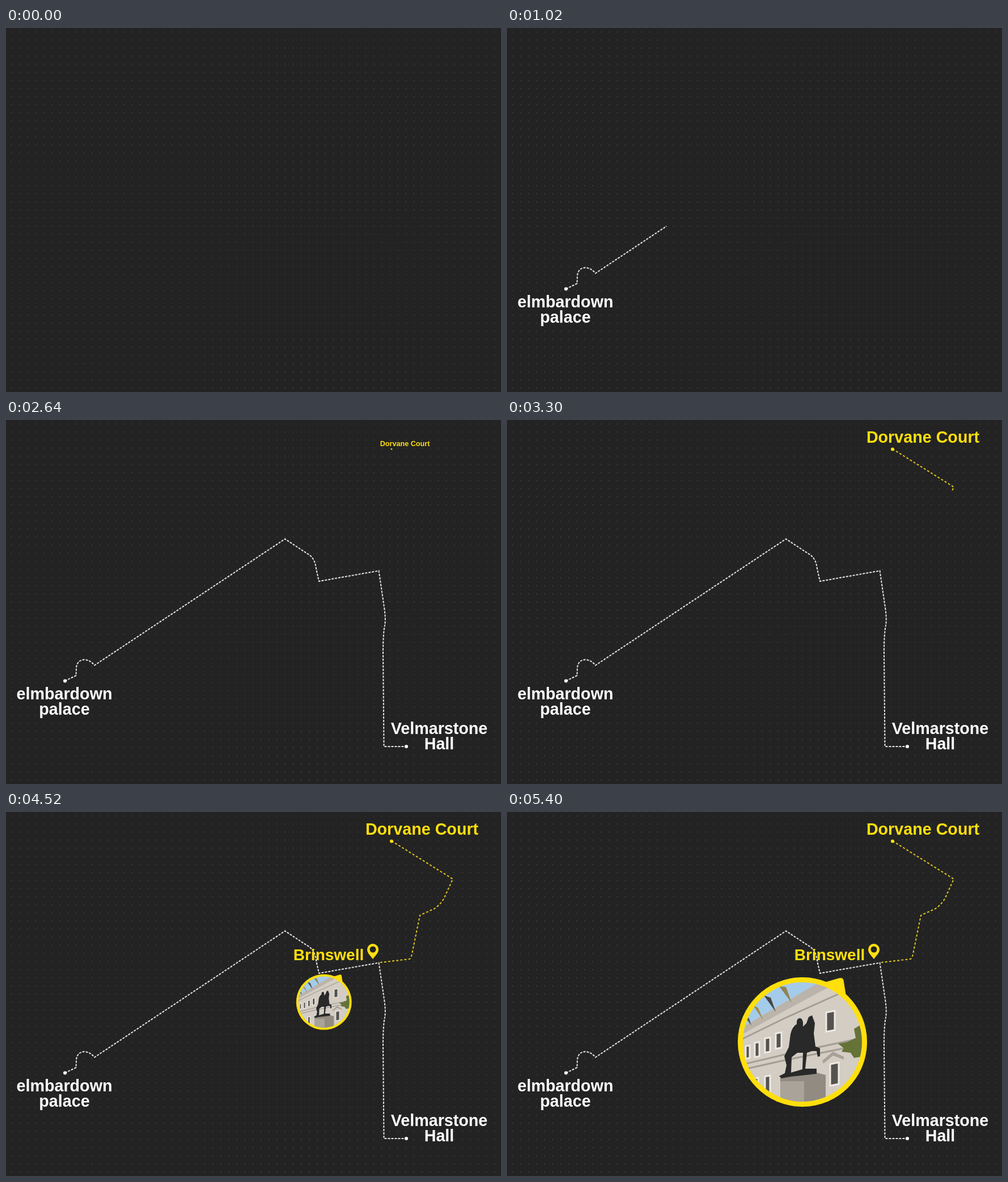
Animation, 873 px wide and 641 px high, one loop 7080 ms. Source, as an HTML page:

```html
<!DOCTYPE html>
<html lang="en">
<head>
<meta charset="utf-8">
<title>Route map</title>
<style>
  html, body { margin: 0; width: 100%; height: 100%; overflow: hidden; background: #232323; }
  svg { display: block; width: 873px; height: 641px; }
  text { font: bold 28.7px 'Liberation Sans', Arial, sans-serif; text-anchor: middle; }
  .white { fill: #fff; }
  .yellow { fill: #ffdf0c; }
  .route { fill: none; stroke-width: 2; }
</style>
</head>
<body>
<svg viewBox="0 0 873 641">
  <defs>
    <clipPath id="lens"><circle cx="521" cy="405" r="105"/></clipPath>
  </defs>
  <path id="grid" fill="#686868"/>

  <path id="walk" class="route" stroke="#e2e2e2" d="M104 459.5L123.500 450L124 436Q126 422 139 422Q149 423 156 432L492 209.500L534 237Q545 244 547 262L552 284L657.500 265.500L667 330Q670 350 668 362Q665 375 665 410L666.500 575H706"/>
  <path id="detour" class="route" stroke="#dfc51c" d="M680 51L788 118L772 153Q765 164 756 170L730 182L717 245Q715 258 711 259L660 265"/>

  <g id="start" class="white">
    <circle cx="104" cy="459.5" r="3"/>
    <text x="103" y="492">elmbardown</text>
    <text x="103" y="519">palace</text>
  </g>
  <g id="finish" class="white">
    <circle cx="706" cy="575" r="3"/>
    <text x="764" y="553">Velmarstone</text>
    <text x="764" y="580">Hall</text>
  </g>
  <g id="station" class="yellow">
    <circle cx="680" cy="51.5" r="3"/>
    <text x="733.5" y="40">Dorvane Court</text>
  </g>
  <g id="stop" class="yellow">
    <text x="569" y="260.500" style="font-size:28px">Brinswell</text>
    <path fill-rule="evenodd" d="M647 259C643 253 637 249 637 242a10 10 0 0 1 20 0C657 249 651 253 647 259zM641.500 242a5.500 5.500 0 0 0 11 0a5.500 5.500 0 0 0 -11 0z"/>
  </g>

  <g id="photo">
    <path class="yellow" d="M560 300L586 292.500Q592 291 593.500 296L598 324L570 330Z"/>
    <circle class="yellow" cx="521" cy="405" r="114"/>
    <g clip-path="url(#lens)">
      <rect x="410" y="295" width="222" height="222" fill="#d3cdc4"/>
      <path fill="#a5cbea" d="M410 295H552L540 307L490 335L410 382Z"/>
      <path fill="#bbb4aa" d="M410 382L490 335L552 299H585L490 350L410 394Z"/>
      <path fill="none" stroke="#a59e95" stroke-width="3" d="M410 402L490 363L630 300M410 446L490 427L630 397M410 455L490 437L630 409"/>
      <path fill="#464542" d="M453 323L465 327L474 352Z"/>
      <path fill="#8f8352" d="M480 307L492 308L502 336Z"/>
      <path fill="#a18a4a" d="M433 339L443 345L452 367Z"/>
      <path fill="#5b5a55" d="M420 362L427 363L431 376Z"/>
      <g id="windows" fill="#55534f" stroke="#eeeae3" stroke-width="3"></g>
      <path fill="#a8a198" d="M556 438L575 422L594 431V436L575 429L558 443Z"/>
      <path fill="#657238" d="M628 372L612 382L615 398L600 405L584 408L594 416L590 422L606 424L612 433L630 430Z"/>
      <path fill="#918b82" d="M482 466L525 454L562 463V520H482Z"/>
      <path fill="#aaa399" d="M482 474H524V520H482Z"/>
      <path fill="#292929" d="M480 465L490 460L493 446L489 430L497 414L500 391Q504 376 511 374Q510 363 517 363Q523 364 522 378L528 372L532 361L538 358L543 372L541 390L544 413L552 416L552 430L548 431L546 421L538 421L529 424L526 452L546 452V461L500 466L484 469ZM512 424L502 432L501 459L521 453L522 424Z"/>
    </g>
  </g>
</svg>
<script>
const LOOP = 7080;
const $ = id => document.getElementById(id);

let dots = '';
for (let x = 9; x < 873; x += 14.2)
  for (let y = 6.5; y < 641; y += 14.24)
    dots += `M${x.toFixed(2)} ${y.toFixed(2)}h1.1v1.1h-1.1z`;
$('grid').setAttribute('d', dots);

// Facade windows: x, y, width, height
$('windows').innerHTML = [
  [563, 350, 15, 34], [505, 376, 11, 28], [474, 388, 10, 27], [455, 397, 9, 25],
  [437, 405, 8, 25], [421, 411, 7, 22], [570, 441, 15, 38], [455, 464, 9, 30], [435, 468, 8, 28]
].map(([x, y, w, h]) =>
  `<path d="M${x} ${y + w / 5}l${w} ${-w / 5}v${h}l${-w} ${w / 5}z"/>`).join('');

// Drawn length in px at given times
const routes = [
  { id: 'walk', on: 4, off: 2,
    keys: [[300, 0], [740, 59], [1440, 483], [1700, 568], [2160, 760], [2500, 1060]] },
  { id: 'detour', on: 4, off: 3.2,
    keys: [[3130, 0], [3300, 135], [3840, 320], [3920, 360]] }
];

// Labels grow from an anchor point
const pops = [
  { id: 'start', x: 104, y: 459.5, at: 10, ms: 190 },
  { id: 'finish', x: 706, y: 575, at: 2300, ms: 220 },
  { id: 'station', x: 680, y: 51, at: 2597, ms: 403 },
  { id: 'stop', x: 647, y: 259, at: 4190, ms: 300 },
  { id: 'photo', x: 590.5, y: 282, at: 4488, ms: 312 }
];

function valueAt(keys, t) {
  if (t <= keys[0][0]) return keys[0][1];
  for (let i = 1; i < keys.length; i++) {
    const [t0, a] = keys[i - 1], [t1, b] = keys[i];
    if (t < t1) return a + (b - a) * (t - t0) / (t1 - t0);
  }
  return keys[keys.length - 1][1];
}

function backOut(p) {
  const u = Math.min(1, Math.max(0, p)) - 1;
  return 1 + 2.7 * u ** 3 + 1.7 * u ** 2;
}

function render(t) {
  for (const { id, on, off, keys } of routes) {
    const len = valueAt(keys, t), step = on + off, n = Math.floor(len / step);
    const tail = Math.min(on, len - n * step);
    const line = $(id);
    line.style.display = len > 0 ? '' : 'none';
    line.setAttribute('stroke-dasharray', `${on} ${off} `.repeat(n) + `${tail} 9999`);
  }
  for (const { id, x, y, at, ms } of pops) {
    const s = backOut((t - at) / ms), g = $(id);
    g.style.display = t > at ? '' : 'none';
    g.setAttribute('transform', `translate(${x} ${y}) scale(${s}) translate(${-x} ${-y})`);
  }
}

const begin = performance.now();
function tick() {
  render((performance.now() - begin) % LOOP);
  requestAnimationFrame(tick);
}
render(0);
requestAnimationFrame(tick);
</script>
</body>
</html>
```
